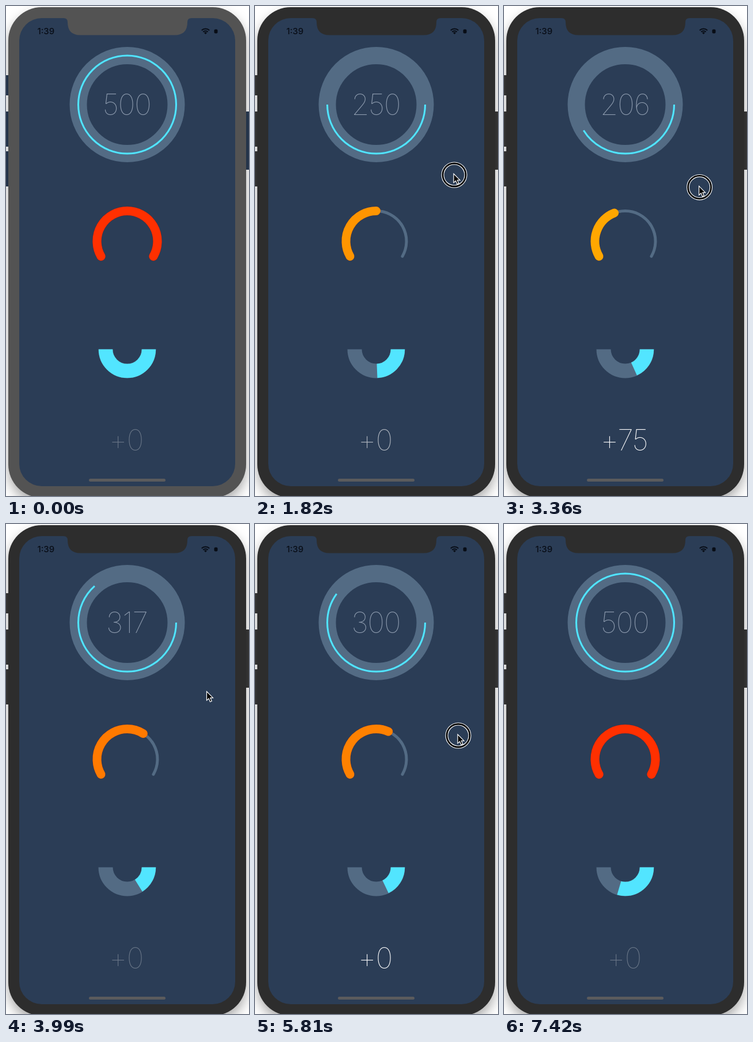
These frames come from a looping animation (422x850 px, 7.49 s). An HTML page:

```html
<!DOCTYPE html>
<html lang="en">
<head>
<meta charset="utf-8">
<title>Progress rings</title>
<style>
html, body { margin: 0; width: 100%; height: 100%; overflow: hidden; background: #fff; }
svg { display: block; width: 422px; height: 850px; }
text { font-family: Inter, Roboto, sans-serif; }
.big { font-size: 50px; font-weight: 100; letter-spacing: -1px; text-anchor: middle; }
.arc, .line { fill: none; }
.track { stroke: #536b84; }
.cyan { stroke: #52e5ff; }
#phone { --bezel: #2d2d2d; --button: #3a3a3a; }
#phone.idle { --bezel: #535353; --button: #2b3d56; }
.bezel { fill: var(--bezel); }
.button { fill: var(--button); }
.shade { filter: drop-shadow(0 10px 10px #0005); }
.ink { fill: #080d16; }
</style>
</head>
<body>
<svg viewBox="0 0 422 850">
  <g id="phone">
    <g class="button">
      <rect x="-4" y="120" width="10" height="35" rx="2"/>
      <rect x="-4" y="183" width="10" height="61" rx="2"/>
      <rect x="-4" y="252" width="10" height="61" rx="2"/>
      <rect x="415" y="183" width="12" height="101" rx="2"/>
    </g>
    <rect class="bezel shade" x="4" y="2" width="413" height="851" rx="58"/>
    <rect x="23" y="21" width="375" height="812" rx="39" fill="#2b3d56"/>
    <path class="bezel" d="M100 20V21Q107 21 107 28Q107 50.5 129 50.5H293Q315 50.5 315 28Q315 21 322 21V20Z"/>
  </g>

  <text class="ink" x="54.5" y="49" font-size="15" font-weight="500">1:39</text>
  <g class="line" stroke="#080d16" stroke-width="2">
    <path d="M339.8 42.2A9.5 9.5 0 0 1 353.2 42.2"/>
    <path d="M342.4 45A5.8 5.8 0 0 1 350.6 45"/>
  </g>
  <path class="ink" d="M346.5 49L344 46.4A3.6 3.6 0 0 1 349 46.4Z"/>
  <rect class="ink" x="361.5" y="40.5" width="6" height="7" rx="2"/>
  <rect x="144" y="820" width="133" height="5" rx="2.5" fill="#5b5b5d"/>

  <g class="arc">
    <circle class="track" cx="210.5" cy="171" r="85" stroke-width="30"/>
    <circle class="fill" cx="210.5" cy="171" r="85" pathLength="1" stroke="#3f7d9c" stroke-opacity=".5" stroke-width="4.5"/>
    <circle class="fill cyan" cx="210.5" cy="171" r="85" pathLength="1" stroke-width="3"/>
  </g>
  <text id="value" class="big" x="210" y="189" fill="#8f9db0"></text>

  <g class="arc" stroke-linecap="round">
    <path class="track" d="M165 434.25A52.5 52.5 0 1 1 256 434.25" stroke-width="5"/>
    <path id="rim" class="fill" d="M165 434.25A52.5 52.5 0 1 1 256 434.25" pathLength="1" stroke="#8c1c14" stroke-width="16"/>
    <path id="gauge" class="fill" d="M165 434.25A52.5 52.5 0 1 1 256 434.25" pathLength="1" stroke-width="15"/>
  </g>

  <g class="arc">
    <path class="track" d="M248 595.5A37.5 37.5 0 0 1 173 595.5" stroke-width="25"/>
    <path id="half" class="cyan" d="M248 595.5A37.5 37.5 0 0 1 173 595.5" pathLength="1" stroke-width="24.4"/>
  </g>

  <text id="delta" class="big" x="208.5" y="771" fill="#fff"></text>

  <g id="pointer">
    <g id="press" class="line">
      <circle cx="1" cy="2" r="20" stroke="#fff" stroke-width="5"/>
      <circle cx="1" cy="2" r="20" stroke="#000" stroke-width="2.8"/>
    </g>
    <path d="M0 0V15.5L3.6 12.2L6 18L8.8 16.8L6.4 11.2H11Z" stroke="#fff" stroke-width="1.2"/>
  </g>
</svg>
<script>
const LOOP = 7490, STEP = 70;
const LOOKAHEAD = 210;  // span over which the change label is measured
const FULL = 500;
const $ = id => document.getElementById(id);

// Each change eases the value to a new one.
const changes = [
  { from: 630, to: 1343, value: 250 },
  { from: 2150, to: 2580, value: 22 },
  { from: 2745, to: 3800, value: 317 },
  { from: 4400, to: 5200, value: 300 },
  { from: 6060, to: 6900, value: FULL },
];
// The pointer and the half ring glide between these stops.
const stops = [
  { t: 140, half: 1, x: 424, y: 560 },
  { t: 630, half: .92, x: 323, y: 450 },
  { t: 1820, half: .487, x: 345, y: 291 },
  { t: 2660, half: .414, x: 327, y: 338 },
  { t: 3990, half: .322, x: 348.5, y: 290.5 },
  { t: 5810, half: .358, x: 352, y: 365 },
  { t: 7350, half: .592, x: 426, y: 420 },
];

const clamp = p => Math.min(1, Math.max(0, p));
const smooth = p => p * p * (3 - 2 * p);
const mix = (a, b, p) => a + (b - a) * p;
const within = (t, a, b) => t >= a && t < b;

const valueAt = t => changes.reduce(
  (v, c) => mix(v, c.value, smooth(clamp((t - c.from) / (c.to - c.from)))), FULL);

// 1 around a change, fading out on both sides
const glowAt = t => Math.max(...changes.map(
  c => clamp(1 - Math.max(c.from - 260 - t, t - c.to - 40) / 140)));

function stopAt(t) {
  const i = Math.max(1, stops.findIndex(s => s.t > t));
  const last = stops[stops.length - 1];
  if (t >= last.t) return last;
  const a = stops[i - 1], b = stops[i];
  const p = clamp((t - a.t) / (b.t - a.t)), e = smooth(p);
  return { half: mix(a.half, b.half, p), x: mix(a.x, b.x, e), y: mix(a.y, b.y, e) };
}

const fills = document.querySelectorAll(".fill");
const sweep = (node, part) => node.setAttribute("stroke-dasharray", `${part} 2`);

function draw(t) {
  const value = valueAt(t), part = value / FULL;
  const delta = Math.round(valueAt(t + LOOKAHEAD) - value);
  const { half, x, y } = stopAt(t);
  const pressed = within(t, 910, 3850) || within(t, 5600, 6900);

  $("phone").classList.toggle("idle", t < STEP);
  fills.forEach(n => sweep(n, part));
  sweep($("half"), half);
  $("gauge").setAttribute("stroke", `rgb(255 ${250 - 202 * part} 0)`);
  $("rim").setAttribute("stroke-opacity", part * .6);
  $("value").textContent = Math.round(value);
  $("delta").textContent = (delta < 0 ? "-" : "+") + Math.abs(delta);
  $("delta").setAttribute("fill-opacity", mix(.3, 1, glowAt(t)));
  $("pointer").setAttribute("transform", `translate(${x} ${y})`);
  $("press").style.display = pressed ? "" : "none";
}

const start = performance.now();
function tick() {
  const t = (performance.now() - start) % LOOP;
  draw(Math.floor(t / STEP) * STEP);
  requestAnimationFrame(tick);
}
tick();
</script>
</body>
</html>
```
